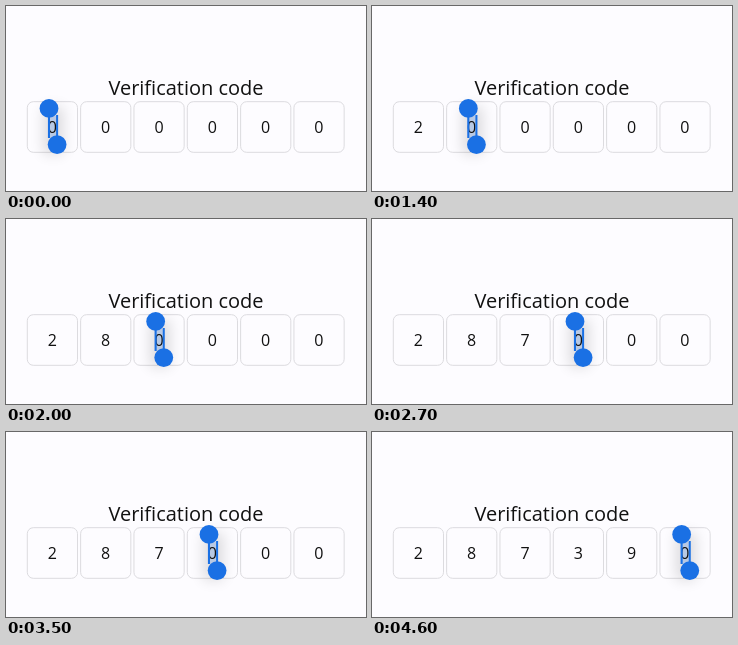
Write an HTML page that moves like this. It is 360 px wide and 185 px high and loops after 5 s.

```html
<!DOCTYPE html>
<html lang="en">
<head>
<meta charset="utf-8">
<title>Verification code</title>
<style>
  html, body { margin: 0; height: 100%; overflow: hidden; background: #fdfcff; }
  svg { display: block; }
  text { font: 16px "Open Sans", "Noto Sans", sans-serif; text-anchor: middle; fill: #111; }
  .title { font-size: 20px; }
  .cell { fill: none; stroke: #dcdbdf; }
  .shadow { fill: #000; opacity: .13; filter: blur(7px); }
  #handles { fill: #1a70e4; }
</style>
</head>
<body>
<svg id="stage" width="360" height="185" viewBox="0 0 360 185">
  <text class="title" x="180" y="89">Verification code</text>
  <g id="cells"></g>
  <g id="focus">
    <rect class="shadow" x="-9" y="101" width="20" height="47"/>
    <rect x="-4.6" y="110" width="9.2" height="22" fill="#1a70e4" opacity=".2"/>
  </g>
  <g id="digits"></g>
  <g id="handles">
    <circle cx="-3.3" cy="102.4" r="9.4"/>
    <rect x="-4.3" y="110" width="2" height="22"/>
    <circle cx="4.8" cy="138.6" r="9.4"/>
    <rect x="3.8" y="109" width="2" height="22"/>
  </g>
</svg>
<script>
const LOOP = 5000, CODE = "287390";
const entered = [1400, 2000, 2500, 4100, 4600];
const fades = [[600, 700, .35], [700, 800, .8], [3400, 3500, .6]];
const $ = id => document.getElementById(id);
const center = i => 46.3 + i * 53.33;

function add(parent, name, attrs) {
  const el = document.createElementNS("http://www.w3.org/2000/svg", name);
  for (const key in attrs) el.setAttribute(key, attrs[key]);
  return parent.appendChild(el);
}

const digits = [...CODE].map((_, i) => {
  const x = center(i);
  add($("cells"), "rect", { class: "cell", x: x - 25, y: 95.7, width: 50.2, height: 50.6, rx: 6 });
  return add($("digits"), "text", { x, y: 127 });
});

function draw(now) {
  const t = now % LOOP;
  const active = entered.filter(at => t >= at).length;
  digits.forEach((el, i) => el.textContent = i < active ? CODE[i] : "0");
  for (const id of ["focus", "handles"])
    $(id).setAttribute("transform", `translate(${center(active)})`);
  const fade = fades.find(([from, to]) => t >= from && t < to);
  $("handles").setAttribute("opacity", fade ? fade[2] : 1);
}

const start = performance.now();
function tick() {
  draw(performance.now() - start);
  requestAnimationFrame(tick);
}
tick();
</script>
</body>
</html>
```
